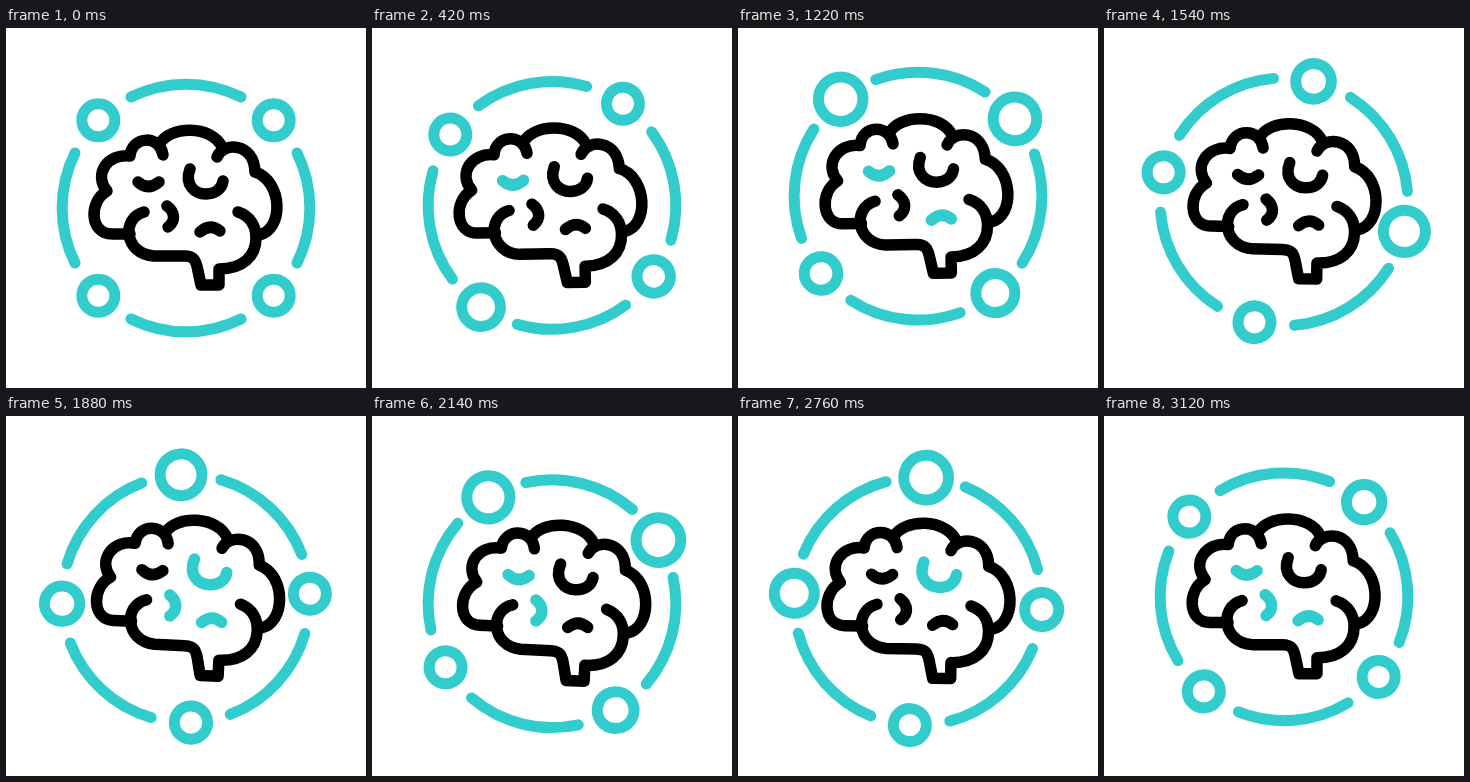
An HTML page for the animation above (3140 ms loop, 360 by 360 pixels).

```html
<!DOCTYPE html>
<html lang="en">
<head>
<meta charset="utf-8">
<title>Brain activity</title>
<style>
  html, body { margin: 0; width: 100%; height: 100%; overflow: hidden; background: #fff; }
  svg { display: block; width: 100vw; height: 100vh; }
  path, circle { fill: none; stroke-width: 11; stroke-linecap: round; stroke-linejoin: round; }
  #ring * { stroke: #33cccc; }
  #brain path { stroke: #000; stroke-width: 11.5; }
  #brain path.lit { stroke: #33cccc; }
</style>
</head>
<body>
<svg viewBox="0 0 360 360">
  <g id="ring"></g>
  <g id="brain">
    <path d="M157 127C154 107 126 107 124 128C102 125 87 146 101 163C82 174 84 206 106 206H124"/>
    <path d="M153 117C163 97 206 97 216 119"/>
    <path d="M211 129C217 114 248 114 249 144C277 153 278 202 253 207"/>
    <path d="M232 184C244 188 250 198 250 210C250 228 237 241 213 241V257H195L192 243C190 232 188 228 178 228H148C118 226 115 190 138 184"/>
    <path class="spark" d="M132 154Q142 163 153 154"/>
    <path class="spark" d="M184 141C178 157 189 166 200 166C209 166 216 161 217 153"/>
    <path class="spark" d="M161 178C169 184 170 193 162 199"/>
    <path class="spark" d="M194 204Q204 195 214 203"/>
  </g>
</svg>
<script>
const LOOP = 3140, STEP = 20, HOLD = 140;
const RADIUS = 124, STROKE = 11;

// Key poses as [step, value], joined by cosine easing
const spin = [[0, 0], [31, -23.8], [158, 360]];
const lift = [[0, 0], [47, -12.5], [110, 9], [158, 0]];
const tilt = [[0, 0], [32, -2.5], [94, 2.8], [158, 0]];

// Each node swells twice, one after the other in this order
const order = [3, 1, 0, 2];
const PULSE = { stagger: 10.5, length: 58, period: 68 };

// Inner lines blink: lit while the step within the period lies in the range
const blinks = [
  { period: 48, from: 4, to: 20 },
  { period: 55, from: 20, to: 38 },
  { period: 58, from: 20, to: 44 },
  { period: 32, from: 20, to: 32 }
];

const ring = document.getElementById("ring");
const brain = document.getElementById("brain");
const sparks = document.querySelectorAll(".spark");

function add(name, attrs) {
  const el = document.createElementNS("http://www.w3.org/2000/svg", name);
  for (const key in attrs) el.setAttribute(key, attrs[key]);
  return ring.appendChild(el);
}

const nodes = order.map((_, k) => {
  add("path", { d: `M-55 -111A${RADIUS} ${RADIUS} 0 0 1 55 -111`, transform: `rotate(${k * 90})` });
  return add("circle", { cy: -RADIUS, transform: `rotate(${45 + k * 90})` });
});

function ease(keys, step) {
  const n = keys.findIndex(([end]) => step < end);
  const [a, from] = keys[n - 1], [b, to] = keys[n];
  return from + (to - from) * (1 - Math.cos(Math.PI * (step - a) / (b - a))) / 2;
}

function outerRadius(k, step) {
  const local = step - order[k] * PULSE.stagger;
  const u = (local % PULSE.period) / PULSE.length;
  const active = local > 0 && local < 2 * PULSE.period && u < 1;
  return 22 + (active ? 6 * Math.sin(Math.PI * u) ** 2 : 0);
}

function draw(ms) {
  const step = Math.max(0, Math.floor((ms % LOOP - HOLD) / STEP));
  const y = ease(lift, step);
  ring.setAttribute("transform", `translate(180 ${180 + y}) rotate(${ease(spin, step)})`);
  brain.setAttribute("transform", `translate(0 ${y}) rotate(${ease(tilt, step)} 200 238)`);
  nodes.forEach((node, k) => node.setAttribute("r", outerRadius(k, step) - STROKE / 2));
  sparks.forEach((spark, k) => {
    const { period, from, to } = blinks[k], phase = step % period;
    spark.classList.toggle("lit", phase >= from && phase < to);
  });
}

let start;
function tick(now) {
  start ??= now;
  draw(now - start);
  requestAnimationFrame(tick);
}
draw(0);
requestAnimationFrame(tick);
</script>
</body>
</html>
```
